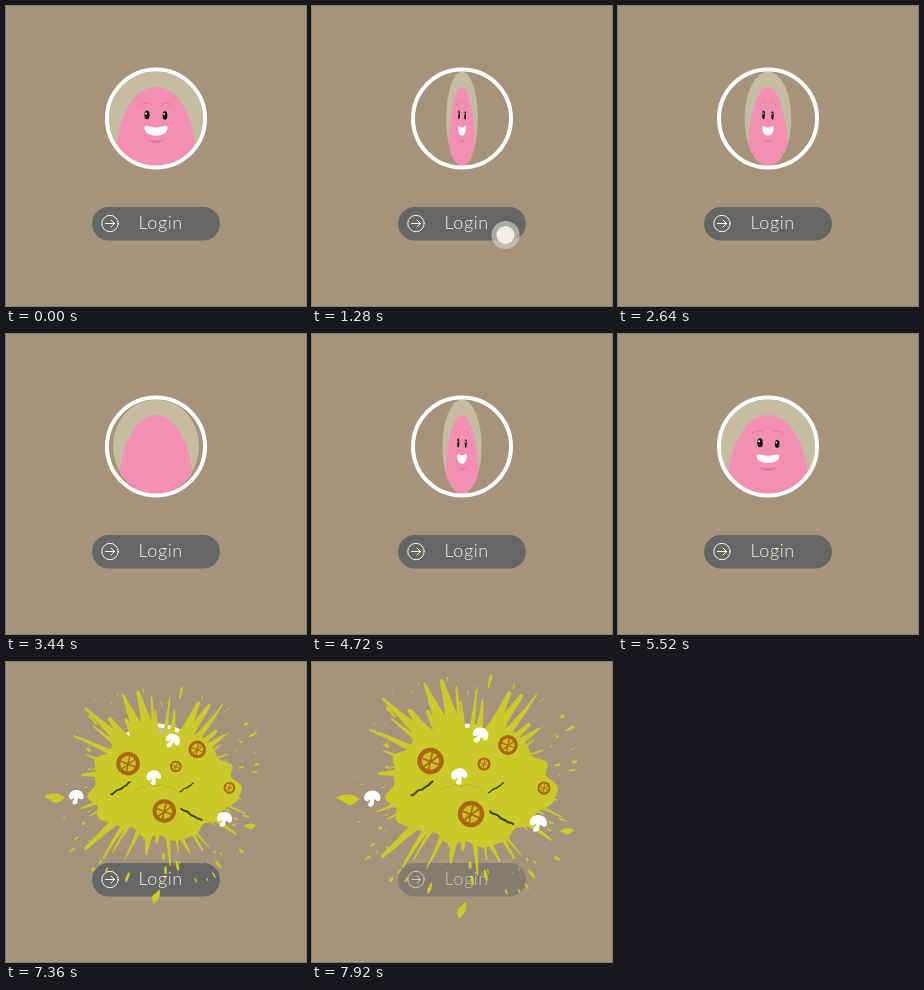
Recreate the animation shown at these times as an HTML page. Size 300x300 px, loop 8 s.

```html
<!DOCTYPE html>
<html lang="en">
<head>
<meta charset="utf-8">
<title>Login</title>
<style>
html, body { margin: 0; width: 100%; height: 100%; overflow: hidden; background: #a5937b; }
svg { display: block; width: 100%; height: 100%; }
text { font: 300 18px Lato, sans-serif; letter-spacing: .6px; fill: #fdf6e9; }
</style>
</head>
<body>
<svg viewBox="0 0 300 300">
  <defs>
    <clipPath id="disc"><circle cx="150" cy="112.5" r="47.5"/></clipPath>
    <g id="slice">
      <circle r="11" fill="#cdbd2c" stroke="#a9680f" stroke-width="4.4"/>
      <path d="M2-9L-2 9M-9-3L9 4M-7 6L8-5" stroke="#a9680f" stroke-width="1.6"/>
    </g>
    <path id="shroom" fill="#fff" d="M-8 1C-9-5-4-8 1-8C6-8 9-4 9 0C9 3 6 4 4 2L3 1C1 3 3 6 1 8C-1 10-4 9-4 7C-4 4-1 4-2 1C-4 4-7 4-8 1Z"/>
    <path id="herb" fill="none" stroke="#3f4a1c" stroke-width="2" stroke-linecap="round" d="M-10 6C-6 6-6 1-2 1S3-3 5-3S8-7 10-7"/>
  </defs>
  <rect width="300" height="300" fill="#a5937b"/>

  <g id="button">
    <rect x="86" y="201" width="128" height="33.5" rx="16.7" fill="#666"/>
    <g fill="none" stroke="#fdf6e9" stroke-linecap="round" stroke-linejoin="round">
      <circle cx="104" cy="217.5" r="8.2"/>
      <path d="M99.5 217.5H108.5M105 214L108.5 217.5L105 221"/>
    </g>
    <text x="132.5" y="222.5">Login</text>
  </g>

  <g clip-path="url(#disc)">
    <g id="card">
      <circle cx="150" cy="112.5" r="47" fill="#c5bca2"/>
      <path fill="#f48fb4" clip-path="url(#disc)" d="M150 81C170 81 185 106 189 134C191 152 174 160 150 160S109 152 111 134C115 106 130 81 150 81Z"/>
      <g id="smile">
        <path d="M134 100Q139 95 144 98M156 98Q161 95 166 100" fill="none" stroke="#d9749c"/>
        <g id="eyes"></g>
        <path id="grin" fill="#fff" d="M138.5 121C141 118.500 144 121.500 150 121.500S159 118.500 161.500 121C162 127 156 129.500 150 129.500S138 127 138.500 121Z"/>
        <path d="M140 132.500Q150 137 160 132.500Q150 141 140 132.500Z" fill="#d9749c"/>
      </g>
    </g>
  </g>
  <circle cx="150" cy="112.500" r="49" fill="none" stroke="#fff" stroke-width="4"/>

  <g id="sick">
    <ellipse cx="153" cy="108" rx="29.500" ry="27" fill="#f48fb4"/>
    <g id="left">
      <path fill="#d9749c" d="M92 120C93 148 131 150 139 121Z"/>
      <path fill="#f48fb4" d="M140 106C132 95 114 96 107 101C97 103 91 112 92 122C101 135 127 132 139 122Z"/>
    </g>
    <g id="right">
      <ellipse cx="182" cy="124" rx="14.500" ry="13" fill="#d9749c"/>
      <path fill="#f48fb4" d="M166 122C168 114 174 111 182 111C191 111 196 116 196 124C191 133 174 133 166 122Z"/>
    </g>
    <path d="M140 137Q151 141 162 137Q151 146 140 137Z" fill="#d9749c"/>
  </g>
  <g id="worry">
    <path d="M137 104Q140 98 146 99M160 96Q165 97 167 101" fill="none" stroke="#d9749c"/>
    <g id="eyes2"></g>
    <path id="wave" d="M141 124Q144 119.500 147.500 123T154 124T160.500 124T166 123" fill="none" stroke="#111" stroke-width="1.800" stroke-linecap="round"/>
  </g>

  <g id="splat">
    <g id="juice" fill="#cbca2a"></g>
    <path d="M127 129Q131 123 137 126Q143 120 149 125Q156 120 161 125Q168 123 171 130" fill="none" stroke="#b5b02c"/>
    <g id="toppings"></g>
  </g>

  <g id="cursor">
    <circle id="halo" fill="#d3d8cb" fill-opacity=".62"/>
    <circle r="9" fill="#f1eee9"/>
  </g>
</svg>
<script>
const LOOP = 8000;
const turns = [0, 960, 1440, 1920, 2400, 3360, 5280];
const el = id => document.getElementById(id);
const span = (t, a, b) => Math.max(0, Math.min(1, (t - a) / (b - a)));
const mix = (a, b, k) => a + (b - a) * k;
const out = k => 1 - (1 - k) ** 3;
const ease = k => k * k * (3 - 2 * k);
const set = (id, attrs) => { for (const k in attrs) el(id).setAttribute(k, attrs[k]); };
const about = (x, y, sx, sy) => `translate(${x} ${y}) scale(${sx} ${sy}) translate(${-x} ${-y})`;
const show = (id, on) => set(id, { opacity: +on });
const times = (n, fn) => Array.from({ length: n }, (_, i) => fn(i)).join('');

let seed = 23;
const rnd = () => (seed = seed * 16807 % 2147483647) / 2147483647;
const TAU = Math.PI * 2, deg = a => a * 360 / TAU;

const eye = (x, y, rx, ry) =>
  `<ellipse cx="${x}" cy="${y}" rx="${rx}" ry="${ry}" fill="#111"/>` +
  `<circle cx="${x - rx * .35}" cy="${y - ry * .35}" r="${rx * .38}" fill="#fff"/>`;

// Distance to a rounded box, so that the diagonals reach furthest
const reach = a => 88 / (Math.cos(a) ** 4 + Math.sin(a) ** 4) ** .25;

function blob() {
  const points = times(90, i => {
    const a = i / 90 * TAU;
    const r = 1 + .05 * Math.sin(5 * a + 1) + .04 * Math.sin(11 * a) + .03 * Math.sin(17 * a + 2);
    return `${158 + 82 * r * Math.cos(a)},${124 + 58 * r * Math.sin(a)} `;
  });
  return `<polygon points="${points}"/>`;
}

function ray(i, n) {
  const a = (i + rnd()) / n * TAU;
  const len = reach(a) * mix(.72, 1.1, rnd());
  const w = mix(4, 13, rnd() ** 2), tip = mix(.5, w * .24, rnd()), bend = mix(-5, 5, rnd());
  return `<path transform="translate(154 116) rotate(${deg(a)})" d="M30 ${-w}Q${len * .65} ${bend - w * .4} ${len} ${-tip}` +
    `a${tip * 1.8} ${tip} 0 0 1 0 ${2 * tip}Q${len * .65} ${bend + w * .4} 30 ${w}Z"/>`;
}

function drop() {
  const a = rnd() * TAU, d = reach(a) * mix(.85, 1.25, rnd()), size = mix(.4, 1.7, rnd() ** 2);
  return `<ellipse rx="${size * mix(1, 4, rnd())}" ry="${size}" transform="translate(` +
    `${154 + d * Math.cos(a)} ${125 + d * Math.sin(a)}) rotate(${deg(a)})"/>`;
}

const leaf = (x, y, size, turn) =>
  `<path transform="translate(${x} ${y}) rotate(${turn}) scale(${size})" d="M-12-1Q0-9 12 0Q1 10-4 3Z"/>`;
const put = (id, x, y, size, turn = 0) =>
  `<use href="#${id}" transform="translate(${x} ${y}) rotate(${turn}) scale(${size})"/>`;

el('juice').innerHTML = blob() + times(46, i => ray(i, 46)) + times(90, drop) +
  leaf(36, 137, 1, 0) + leaf(255, 169, .6, -10) + leaf(150, 248, .75, 110);
el('toppings').innerHTML =
  put('slice', 118.5, 99, 1) + put('slice', 196, 83, .75) + put('slice', 172, 102, .5) +
  put('slice', 159, 152, 1) + put('slice', 232, 126, .5) +
  put('shroom', 168, 73, .95, 25) + put('shroom', 60, 136, .95) +
  put('shroom', 147, 114, .95, -8) + put('shroom', 226, 161, 1, 8) +
  put('herb', 110, 127, 1.05) + put('herb', 184, 126, .75) + put('herb', 189, 156, 1.1, 62);

function drawCard(t) {
  const i = turns.findLastIndex(v => t >= v);
  const last = i === turns.length - 1;
  const w = last ? 1 : mix(1, -1, span(t, turns[i], turns[i + 1]));
  set('card', { transform: about(150, 112.5, Math.max(.01, Math.abs(w)), 1) });
  return (i % 2 === 0) === (w >= 0);
}

function drawFace(t, front) {
  const k = ease(span(t, 5280, 6240));
  const worried = t >= 5840;
  show('smile', front && !worried);
  set('grin', { transform: about(150, 124, mix(1, .85, k), mix(1, .2, k)) });
  el('eyes').innerHTML = el('eyes2').innerHTML =
    eye(mix(141, 147.5, k), mix(109, 107.5, k), mix(2.6, 3.7, k), mix(4.4, 5.2, k)) +
    eye(mix(159, 160, k), mix(109.5, 112, k), mix(2.4, 1.8, k), mix(4.2, 2.5, k));
  show('worry', worried && t < 7300);
  set('wave', { transform: about(153, 124, mix(.6, 1, k), k) });

  const puff = span(t, 6320, 6480);
  show('sick', t >= 6400);
  for (const [id, x] of [['left', 138], ['right', 168]])
    set(id, { transform: about(x, 122, mix(.3, 1, puff), mix(.5, 1, puff)) });
}

function draw(t) {
  drawFace(t, drawCard(t));

  const burst = mix(.25, 1, out(span(t, 7180, 7560)));
  show('splat', t >= 7200);
  set('splat', { transform: about(152, 124, burst, burst) });
  set('button', { opacity: mix(1, .5, span(t, 7600, 7920)) });

  const go = ease(span(t, 0, 960));
  set('cursor', {
    transform: `translate(${mix(211, 193.5, go)} ${mix(316, 229, go)})`,
    opacity: 1 - span(t, 1560, 2480)
  });
  set('halo', { r: mix(14, 18.5, span(t, 1280, 2000)) });
}

function tick() {
  draw(performance.now() % LOOP);
  requestAnimationFrame(tick);
}
tick();
</script>
</body>
</html>
```
